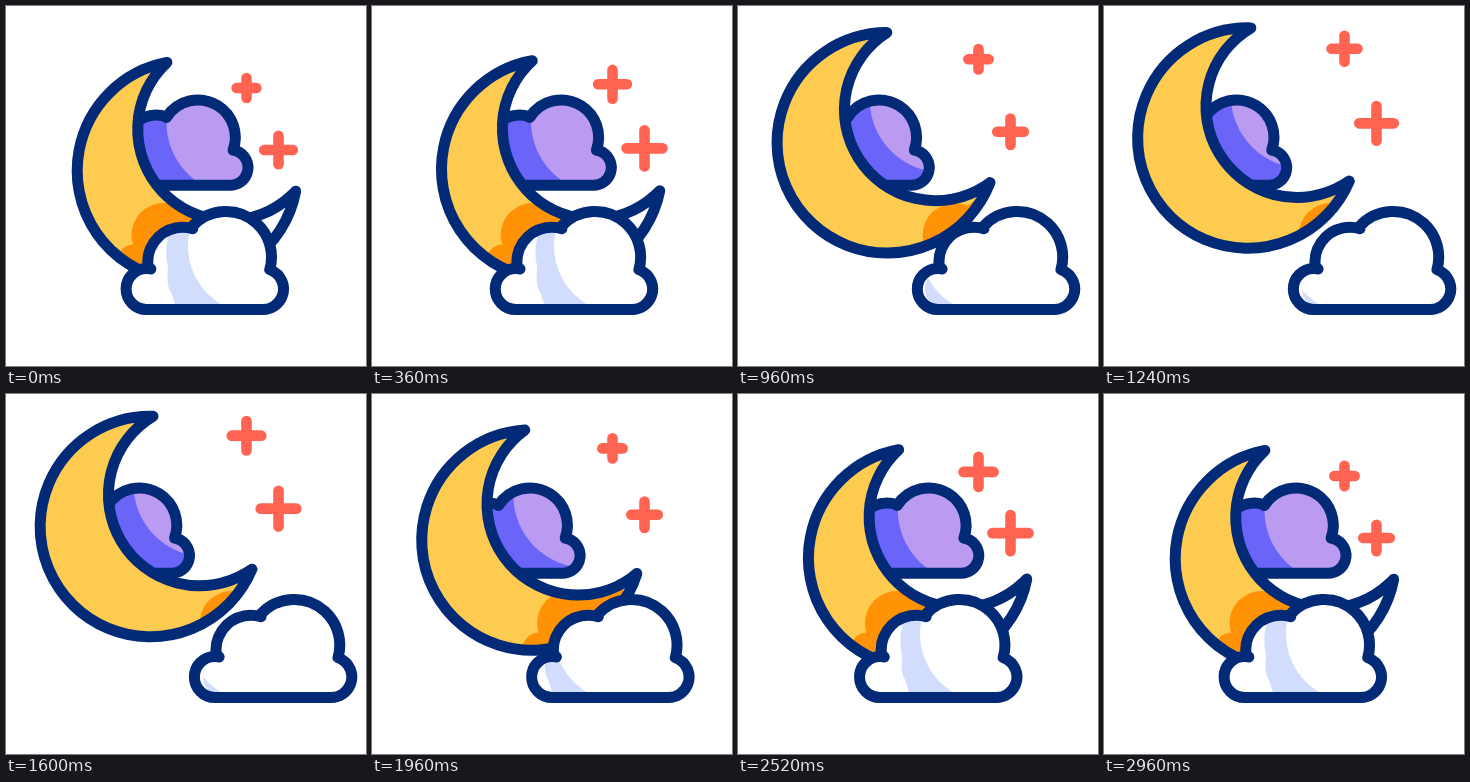
An HTML page with a canvas for the animation above (3000 ms loop, 360 by 360 pixels).

```html
<!DOCTYPE html>
<html lang="en">
<head>
<meta charset="utf-8">
<title>Moon and clouds</title>
<style>
  html, body { margin: 0; width: 100%; height: 100%; overflow: hidden; background: #fff; }
  canvas { display: block; width: 100vmin; height: 100vmin; }
</style>
</head>
<body>
<canvas id="stage"></canvas>
<script>
const LOOP = 3000, SIZE = 360, TAU = Math.PI * 2, DEG = Math.PI / 180;
const INK = '#022a76', YELLOW = '#fdcb50', ORANGE = '#ff9205', STAR = '#ff6452';
const VIOLET = '#6a65f8', LILAC = '#bb9bf1', MIST = '#d2dcfd', WHITE = '#fff';

const canvas = document.getElementById('stage');
const ctx = canvas.getContext('2d');

// Ease with flat ends and control abscissas x1, x2
function ease(u, x1, x2) {
  if (u <= 0) return 0;
  if (u >= 1) return 1;
  let lo = 0, hi = 1;
  for (let i = 0; i < 24; i++) {
    const s = (lo + hi) / 2, r = 1 - s;
    if (3 * r * r * s * x1 + 3 * r * s * s * x2 + s * s * s < u) lo = s; else hi = s;
  }
  return lo * lo * (3 - 2 * lo);
}

// Out and back again, mirrored around the turning point
function swing(t, start, half, x1, x2) {
  return ease(1 - Math.abs(t - start - half) / half, x1, x2);
}

function disc(x, y, r, color) {
  ctx.beginPath();
  ctx.arc(x, y, r, 0, TAU);
  ctx.fillStyle = color;
  ctx.fill();
}

function ink(path) {
  ctx.strokeStyle = INK;
  ctx.lineWidth = 11;
  ctx.stroke(path);
}

function inside(path, paint) {
  ctx.save();
  ctx.clip(path);
  paint();
  ctx.restore();
}

function moved(path, dx) {
  const p = new Path2D();
  p.addPath(path, new DOMMatrix([1, 0, 0, 1, dx, 0]));
  return p;
}

// Each lobe: x, y, radius, start and end angle in degrees, clockwise
function cloud(lobes) {
  const p = new Path2D();
  for (const [x, y, r, a, b] of lobes) p.arc(x, y, r, a * DEG, b * DEG);
  p.closePath();
  return p;
}

const nightCloud = cloud([
  [122, 162, 17.3, 90, 270], [150, 138, 29, 180, 290],
  [192, 131.3, 37.3, 212, 380], [224.3, 161.6, 17.7, -72, 90]
]);
const frontCloud = cloud([
  [140.6, 283, 20.5, 90, 282], [176.6, 256, 34.8, 169, 287],
  [220, 251, 45.5, 222, 376], [257, 283, 20.5, -68, 90]
]);

function crescent(e) {
  const p = new Path2D(), x = 181.4 - 38 * e, y = 164.7 - 33 * e;
  const turn = 12.4 * e * DEG, axis = turn + 135 * DEG;
  const R = 110.2, gap = 58.6, tip = 124.3 * DEG;
  const cx = x - gap * Math.cos(axis), cy = y - gap * Math.sin(axis);
  // tips seen from the inner centre
  const hx = R * Math.cos(tip) + gap, hy = R * Math.sin(tip);
  const inner = Math.atan2(hy, hx);
  p.arc(x, y, R, axis - tip, axis + tip);
  p.arc(cx, cy, Math.hypot(hx, hy), axis + inner, axis - inner, true);
  p.closePath();
  return p;
}

function drawNightCloud(e) {
  const shape = moved(nightCloud, -60 * e);
  inside(shape, () => {
    ctx.fillStyle = VIOLET;
    ctx.fillRect(0, 0, SIZE, SIZE);
    disc(233 - 34 * e, 116.5 - 27 * e, 72.5, LILAC);
  });
  ink(shape);
}

function drawMoon(e) {
  const shape = crescent(e), dx = 70 * e;
  inside(shape, () => {
    ctx.fillStyle = YELLOW;
    ctx.fillRect(0, 0, SIZE, SIZE);
    disc(157.5 + dx, 229, 32, ORANGE);
    disc(128 + dx, 256, 17.5, ORANGE);
    disc(198 + dx, 234, 44, ORANGE);
    ctx.fillStyle = WHITE;
    ctx.fillRect(212 + dx, 0, SIZE, SIZE);
  });
  ink(shape);
}

function drawFrontCloud(e) {
  const shape = moved(frontCloud, 70 * e), x = 160 + 15 * Math.sqrt(e);
  ctx.fillStyle = WHITE;
  ctx.fill(shape);
  inside(shape, () => inside(moved(shape, 9 * e), () => {
    ctx.beginPath();
    ctx.moveTo(x + 6, 220);
    ctx.quadraticCurveTo(x - 3, 240, x + 2, 262);
    ctx.quadraticCurveTo(x, 280, x + 5, 286);
    ctx.lineTo(x + 11, 304);
    ctx.lineTo(222, 304);
    ctx.lineTo(222, 220);
    ctx.fillStyle = MIST;
    ctx.fill();
    disc(250, 240, 68, WHITE);
    ctx.fillRect(187, 215, 60, 25);
  }));
  ink(shape);
}

function drawStar(x, y, reach) {
  const width = 10.6, a = reach - width / 2;
  ctx.beginPath();
  ctx.moveTo(x - a, y);
  ctx.lineTo(x + a, y);
  ctx.moveTo(x, y - a);
  ctx.lineTo(x, y + a);
  ctx.strokeStyle = STAR;
  ctx.lineWidth = width;
  ctx.stroke();
}

function pulse(t, shift, power) {
  return Math.pow(Math.abs(Math.sin(Math.PI * (t / 1000 + shift))), power);
}

function draw(t) {
  const px = Math.max(1, Math.round(Math.min(innerWidth, innerHeight) * devicePixelRatio));
  if (canvas.width !== px) canvas.width = canvas.height = px;
  ctx.setTransform(px / SIZE, 0, 0, px / SIZE, 0, 0);
  ctx.fillStyle = WHITE;
  ctx.fillRect(0, 0, SIZE, SIZE);
  ctx.lineCap = ctx.lineJoin = 'round';

  const e = swing(t, 0, 1389, 0.83, 0.36);
  drawNightCloud(e);
  drawMoon(e);
  drawFrontCloud(e);

  const high = swing(t, 0, 1450, 0.52, 0.63);
  const low = swing(t, 70, 1465, 0.52, 0.6);
  drawStar(240.5, 82 - 41.5 * high, 15.2 + 5.2 * pulse(t, 0, 1.4));
  drawStar(272.5, 144 - 29.5 * low, 18.5 + 5 * pulse(t, 0.04, 0.75));
}

const begin = performance.now();
function tick() {
  draw((performance.now() - begin) % LOOP);
  requestAnimationFrame(tick);
}
tick();
</script>
</body>
</html>
```
